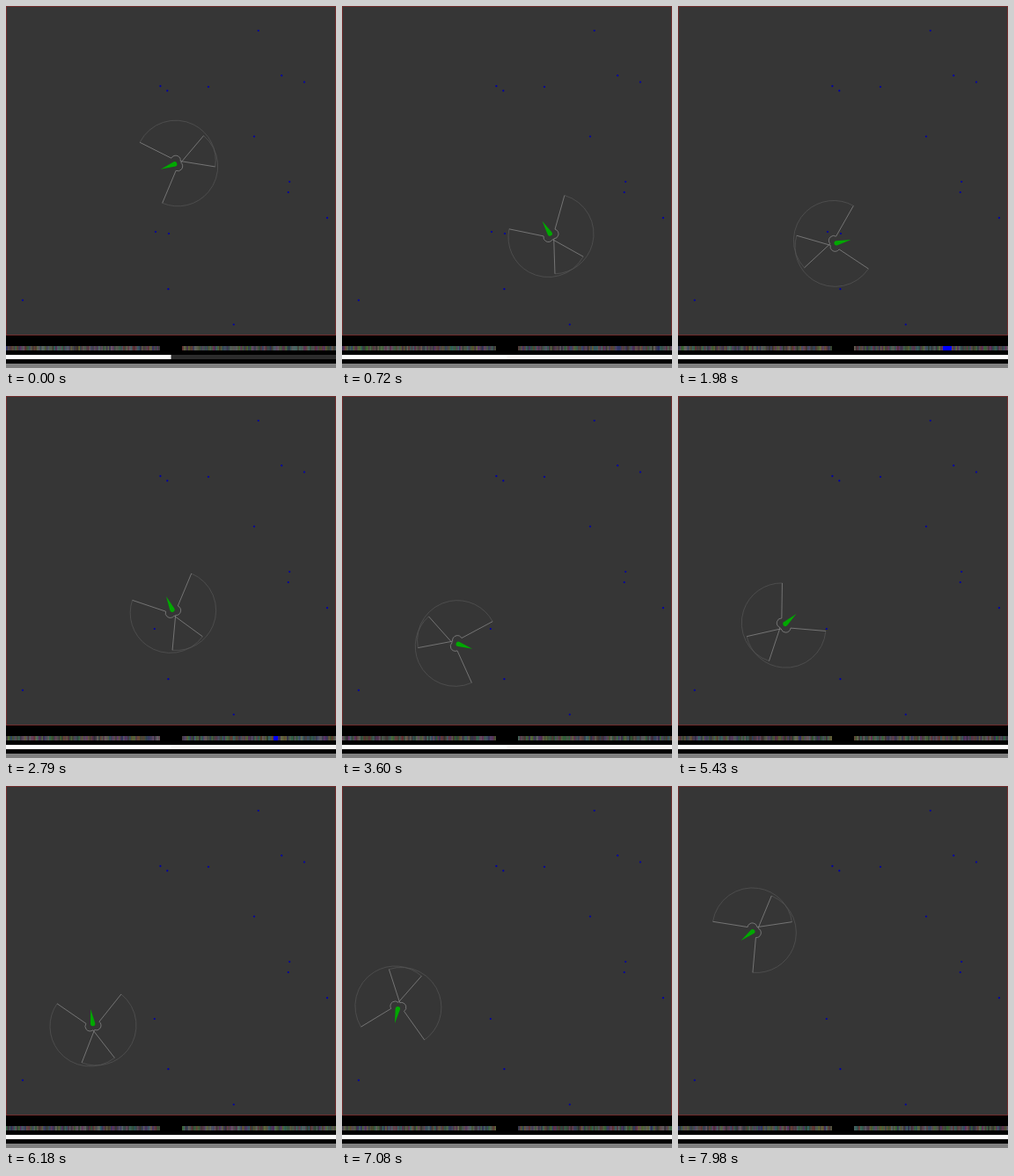
Recreate the animation shown at these times as an HTML page with a canvas. Size 375 by 412 pixels, loop 8000 ms.

```html
<!DOCTYPE html>
<html>
<head>
<meta charset="utf-8">
<style>
  html, body { margin: 0; width: 100%; height: 100%; overflow: hidden; background: #000; }
  canvas { display: block; }
</style>
</head>
<body>
<canvas id="stage" width="375" height="412"></canvas>
<script>
const ctx = document.getElementById('stage').getContext('2d');
const LOOP = 8000, STEP = 30, TAU = Math.PI * 2, DEG = Math.PI / 180;
const EYE_GAP = 3.55, EYE_R = 5.5, SIGHT = 45.5, OUTER = 133 * DEG, INNER = 29.5 * DEG;
const RETINA = 175, CELL = 1.75, LINE = 0.75;
const FOOD_MOVED = 2460;

// Waypoints: time, x, y, heading in degrees, turning radius towards the next one
const route = [
  [0, 194, 179, -20.3, 1],
  [720, 237.5, 261.2, 58.7, 13],
  [1980, 177.7, 270.4, 166.6, 18],
  [3600, 129.9, 281.5, 198.8, 17],
  [4680, 135, 243.8, 177.7, 12],
  [6180, 99, 273, 81.6, 20],
  [7980, 86.7, 164.2, -38, 0]
].map(([t, x, y, deg, r]) => ({ t, x, y, h: deg * DEG, r }));

const food = [[286.8, 28], [313.2, 79.2], [339, 86.6], [175.4, 91.2], [183.3, 96.4], [230, 92],
  [282, 148.5], [322.2, 200], [320.8, 212], [365, 241.2], [184.4, 322.2], [18.9, 334.8], [258.8, 362.5]];
const earlyFood = [[170, 257], [185, 259]], lateFood = [[168.8, 265]];

const wrap = (a, low = 0) => ((a - low) % TAU + TAU) % TAU + low;

// Right turn, straight run, right turn at an even speed
function poseAt(t) {
  let i = 0;
  while (i < route.length - 2 && t >= route[i + 1].t) i++;
  const a = route[i], b = route[i + 1], r = a.r;
  const center = p => [p.x - r * Math.sin(p.h), p.y + r * Math.cos(p.h)];
  const [ax, ay] = center(a), [bx, by] = center(b);
  const run = Math.hypot(bx - ax, by - ay), dir = Math.atan2(by - ay, bx - ax);
  const turnA = wrap(dir - a.h, 0.05), turnB = wrap(b.h - dir, -0.2);
  const share = Math.min(1, (t - a.t) / (b.t - a.t));
  let s = share * (r * (turnA + turnB) + run);
  const onCircle = (cx, cy, h) => ({ x: cx + r * Math.sin(h), y: cy - r * Math.cos(h), h });
  if (s < r * turnA) return onCircle(ax, ay, a.h + s / r);
  s -= r * turnA;
  if (s < run) {
    const p = onCircle(ax, ay, dir);
    return { x: p.x + s * Math.cos(dir), y: p.y + s * Math.sin(dir), h: dir };
  }
  return onCircle(bx, by, dir + (s - run) / r);
}

function eyeOf(pose, side) {
  return {
    x: pose.x - side * EYE_GAP * Math.sin(pose.h),
    y: pose.y + side * EYE_GAP * Math.cos(pose.h),
    from: pose.h - (side < 0 ? OUTER : INNER),
    to: pose.h + (side < 0 ? INNER : OUTER)
  };
}

function drawEye({ x, y, from, to }) {
  ctx.lineWidth = LINE;
  ctx.strokeStyle = '#555';
  ctx.beginPath();
  ctx.arc(x, y, SIGHT, from, to);
  ctx.stroke();
  ctx.strokeStyle = '#888';
  ctx.beginPath();
  ctx.moveTo(x + SIGHT * Math.cos(from), y + SIGHT * Math.sin(from));
  ctx.arc(x, y, EYE_R, from, to);
  ctx.lineTo(x + SIGHT * Math.cos(to), y + SIGHT * Math.sin(to));
  ctx.stroke();
}

function drawBody({ x, y, h }) {
  ctx.save();
  ctx.translate(x, y);
  ctx.rotate(h);
  ctx.fillStyle = '#00a800';
  ctx.beginPath();
  ctx.moveTo(-19.3, 0);
  ctx.lineTo(-3, -2.7);
  ctx.arc(-2.5, 0, 2.7, -Math.PI / 2, Math.PI / 2);
  ctx.fill();
  ctx.restore();
}

function drawFood([x, y]) {
  ctx.fillStyle = '#0000a8';
  ctx.beginPath();
  ctx.arc(x, y, 1.1, 0, TAU);
  ctx.fill();
}

function randomFrom(seed) {
  return () => {
    seed = (seed + 0x6D2B79F5) | 0;
    let n = Math.imul(seed ^ seed >>> 15, 1 | seed);
    n ^= n + Math.imul(n ^ n >>> 7, 61 | n);
    return ((n ^ n >>> 14) >>> 0) / 4294967296;
  };
}

function box(color, x, y, w, h) {
  ctx.fillStyle = color;
  ctx.fillRect(x, y, w, h);
}

// One eye's retina: noise, with nearby food showing as blue
function drawRetina(left, eye, items, random) {
  const level = () => 45 + random() * 60 | 0;
  for (let x = 0; x < RETINA; x += CELL) {
    box(`rgb(${level()},${level()},${level()})`, left + x, 387, Math.min(CELL + 0.5, RETINA - x), 5);
  }
  const span = eye.to - eye.from, scale = RETINA / span;
  for (const [fx, fy] of items) {
    const dx = fx - eye.x, dy = fy - eye.y, dist = Math.hypot(dx, dy);
    const angle = wrap(Math.atan2(dy, dx) - eye.from);
    if (dist > SIGHT || angle > span) continue;
    const half = Math.atan(1 / Math.max(dist, 1)) * scale;
    const start = Math.max(0, Math.round(angle * scale - half));
    const end = Math.min(RETINA, Math.round(angle * scale + half));
    box('#0000ff', left + start, 387, end - start, 5);
  }
}

function outputColor(t) {
  if (t < STEP) return '#2c2c2c';
  return t < 810 || (t >= FOOD_MOVED && t < 4080) ? '#faf8f7' : '#fff';
}

function draw(t) {
  const pose = poseAt(t), eyes = [eyeOf(pose, -1), eyeOf(pose, 1)];
  const items = food.concat(t < FOOD_MOVED ? earlyFood : lateFood);
  box('#000', 0, 0, 375, 412);
  box('#363636', 0, 0, 375, 375);
  ctx.lineWidth = 1;
  ctx.strokeStyle = '#702c2c';
  ctx.strokeRect(0.5, 0.5, 374, 374);

  eyes.forEach(drawEye);
  drawBody(pose);
  items.forEach(drawFood);

  const random = randomFrom(t + 7);
  drawRetina(0, eyes[0], items, random);
  drawRetina(200, eyes[1], items, random);
  box(outputColor(t), 0, 397, 375, 5);
  box('#fff', 0, 397, 187.5, 5);
  box('#808080', 0, 407, 375, 5);
}

function tick() {
  const t = performance.now() % LOOP;
  draw(Math.floor(t / STEP) * STEP);
  requestAnimationFrame(tick);
}
tick();
</script>
</body>
</html>
```
